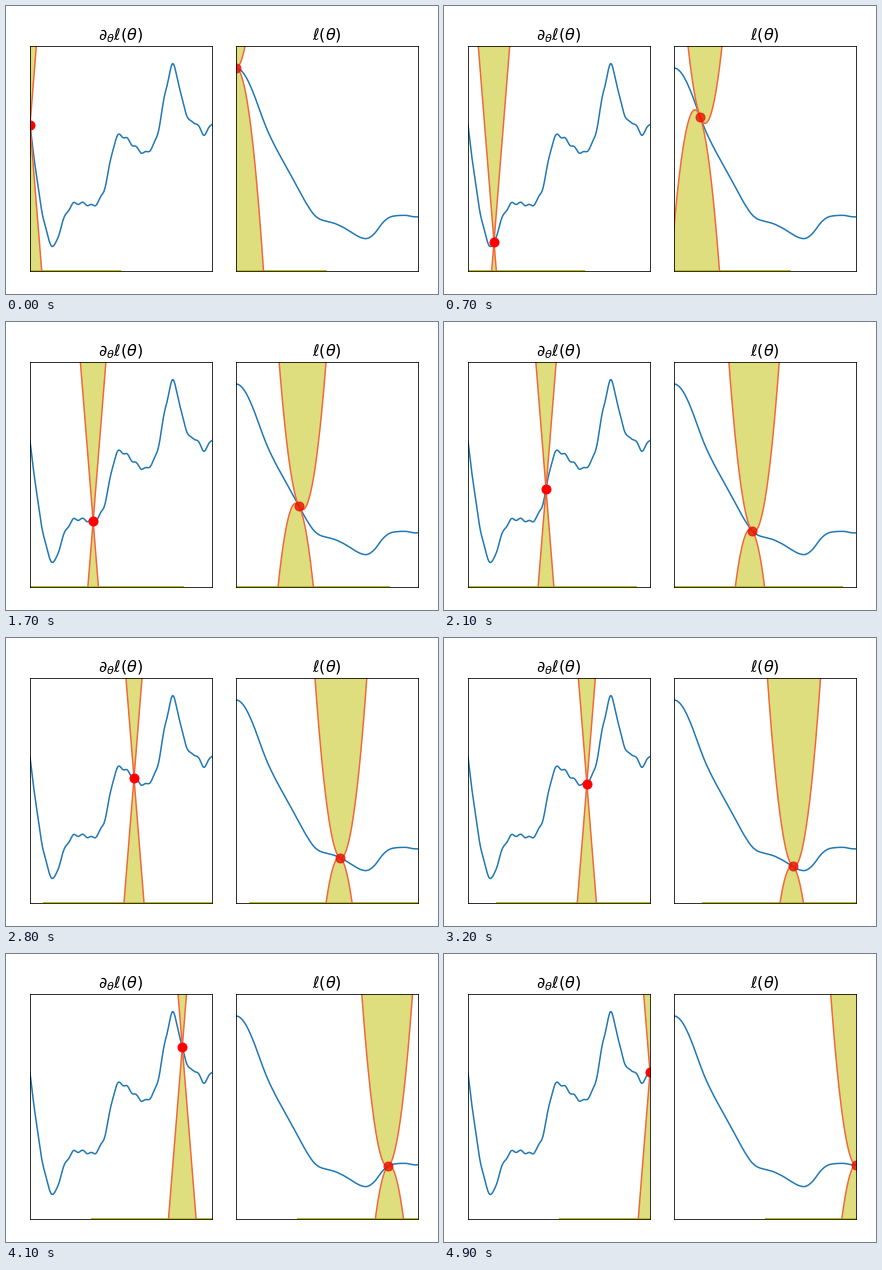
A matplotlib script that plays this animation: 432 by 288 pixels, repeating every 5 s.

```python
import matplotlib.pyplot as plt
import numpy as np
from matplotlib.animation import FuncAnimation

W, H, DPI = 432, 288, 72
FRAMES, INTERVAL = 50, 100
SPAN, TOP, BOTTOM = 182, 40, 265
LEFT_X, RIGHT_X = 24, 230
CONE_SLOPE = 12.46      # gradient bound, in pixels
CURVATURE = 0.268       # quadratic bound, in pixels
SLOPE_SCALE, ZERO_Y, START_Y = 0.0231, 119.1, 62
RIPPLE, RIPPLE_PERIOD, RIPPLE_PEAK = 1.3, 9, 48

# Main bends of the derivative curve: offset from the left edge, height
BENDS = np.array([
    (0, 119.6), (10, 194), (24, 240), (33, 215), (41, 200), (53, 197.5),
    (66, 198), (73, 187), (87, 131), (95, 131.5), (103, 139), (118, 145.5),
    (127, 130), (136, 83.5), (142.5, 59), (152, 93), (159, 114), (166, 117),
    (174, 128), (182, 117.5)])


def smooth(x, points):
    """Cubic Hermite curve through the points."""
    kx, ky = points.T
    slope = np.gradient(ky, kx)
    i = np.clip(np.searchsorted(kx, x, side="right") - 1, 0, len(kx) - 2)
    h = kx[i + 1] - kx[i]
    t = (x - kx[i]) / h
    return ((1 + 2 * t) * (1 - t) ** 2 * ky[i] + t * (1 - t) ** 2 * h * slope[i]
            + t * t * (3 - 2 * t) * ky[i + 1] - t * t * (1 - t) * h * slope[i + 1])


xs = np.linspace(0, SPAN, 365)
ripple = RIPPLE * np.cos(2 * np.pi * (xs - RIPPLE_PEAK) / RIPPLE_PERIOD)
grad = smooth(xs, BENDS) + ripple

# The loss is the integral of its derivative
steepness = (grad - ZERO_Y) * SLOPE_SCALE
steps = (steepness[1:] + steepness[:-1]) / 2 * np.diff(xs)
loss = START_Y + np.concatenate([[0], np.cumsum(steps)])

fig = plt.figure(figsize=(W / DPI, H / DPI), dpi=DPI, facecolor="white")


def make_axes(left, title):
    rect = [left / W, (H - BOTTOM) / H, SPAN / W, (BOTTOM - TOP) / H]
    ax = fig.add_axes(rect)
    ax.set(xlim=(0, SPAN), ylim=(BOTTOM, TOP), xticks=[], yticks=[])
    ax.set_title(title, fontsize=16)
    return ax


class Panel:
    def __init__(self, left, title, curve, dot_color, dot_alpha):
        self.ax = make_axes(left, title)
        self.curve = curve
        self.ax.plot(xs, curve, color="C0", lw=1.5, zorder=1)
        self.strip, = self.ax.plot([], [], color="y", lw=2, zorder=1.1,
                                   solid_capstyle="butt")
        self.fills = [self.ax.fill([0], [0], color="y", alpha=0.5, lw=0,
                                   zorder=1.5)[0] for _ in range(2)]
        self.edges = [self.ax.plot([], [], color="#f0683a", lw=1.5,
                                   zorder=2)[0] for _ in range(2)]
        self.dot, = self.ax.plot([], [], "o", color=dot_color, ms=9, mew=1,
                                 alpha=dot_alpha, zorder=2.2)

    def update(self, x, bound):
        y = np.interp(x, xs, self.curve)
        dx = np.linspace(-SPAN / 2, SPAN / 2, 401)
        self.dot.set_data([x], [y])
        self.strip.set_data([x - SPAN / 2, x + SPAN / 2], [BOTTOM, BOTTOM])
        for sign, limit, fill, edge in zip((-1, 1), (TOP, BOTTOM),
                                           self.fills, self.edges):
            px, py = x + dx, y + bound(dx, sign)
            edge.set_data(px, py)
            capped = np.maximum(py, limit) if sign < 0 else np.minimum(py, limit)
            outline = np.column_stack([px, capped])
            ends = [(px[-1], limit), (px[0], limit)]
            fill.set_xy(np.vstack([outline, ends]))
        return [self.dot, self.strip, *self.fills, *self.edges]


grad_panel = Panel(LEFT_X, r"$\partial_\theta \ell(\theta)$", grad, "red", 1)
loss_panel = Panel(RIGHT_X, r"$\ell(\theta)$", loss, "#e81000", 0.8)


def draw(frame):
    x = SPAN * frame / (FRAMES - 1)
    tilt = np.interp(x, xs, steepness)
    return (grad_panel.update(x, lambda d, s: s * CONE_SLOPE * abs(d))
            + loss_panel.update(x, lambda d, s: tilt * d + s * CURVATURE * d * d))


anim = FuncAnimation(fig, draw, frames=FRAMES, interval=INTERVAL,
                     init_func=lambda: draw(0), repeat=True, repeat_delay=0)
plt.show()
```
